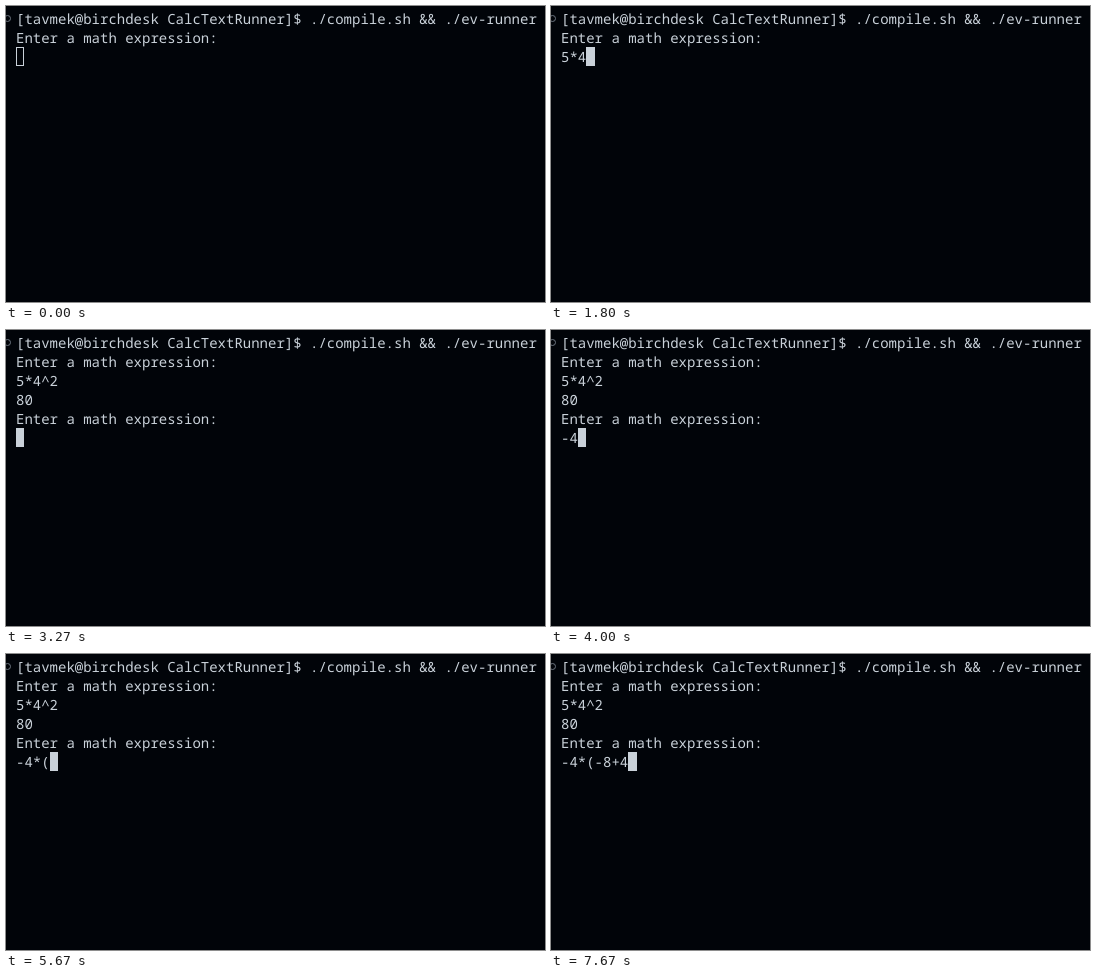
Write an HTML page that moves like this. It is 539 px wide and 296 px high and loops after 8 s.

```html
<!DOCTYPE html>
<html lang="en">
<head>
<meta charset="utf-8">
<title>Terminal</title>
<style>
  html, body {
    margin: 0;
    width: 100%;
    height: 100%;
    overflow: hidden;
    background: #010409;
  }
  #screen {
    position: absolute;
    left: 10px;
    top: 4px;
    margin: 0;
    color: #c9d1d9;
    font: 14px/19px "Noto Sans Mono", monospace;
    font-variant-ligatures: none;
    text-rendering: geometricPrecision;
  }
  #cursor {
    position: absolute;
    box-sizing: border-box;
    height: 19px;
    border: 1px solid #c9d1d9;
  }
  #mark {
    position: absolute;
    left: 0;
    top: 0;
  }
</style>
</head>
<body>
<svg id="mark" width="10" height="24"><circle cx="1.5" cy="12.5" r="3" fill="none" stroke="#6e7681"/></svg>
<pre id="screen"></pre>
<div id="cursor"></div>
<script>
const LOOP = 8000, FOCUS = 70;
const LEFT = 10, TOP = 3, CELL = 8.4, LINE = 19;
const ASK = "Enter a math expression:\n";
const FIRST = "[tavmek@birchdesk CalcTextRunner]$ ./compile.sh && ./ev-runner\n" + ASK;
const SECOND = FIRST + "5*4^2\n80\n" + ASK;

// [start time, text before the cursor]
const steps = [
  ...[[0, ""], [600, "5"], [970, ""], [1030, "5"], [1430, "5*"], [1800, "5*4"],
      [2500, "5*4^"], [3100, "5*4^2"], [3200, "5*4^2\n"]].map(([t, s]) => [t, FIRST + s]),
  ...[[3270, ""], [3870, "-"], [4000, "-4"], [4800, "-4*"], [5130, "-4*(8"], [5670, "-4*("],
      [6200, "-4*(-"], [6900, "-4*(-8"], [7370, "-4*(-8+"], [7670, "-4*(-8+4"]].map(([t, s]) => [t, SECOND + s])
];

const screenEl = document.getElementById("screen");
const cursorEl = document.getElementById("cursor");
const cellX = col => Math.round(LEFT + col * CELL);

function draw(now) {
  const t = now % LOOP;
  const text = steps.findLast(([start]) => start <= t)[1];
  const lines = text.split("\n");
  const col = lines.at(-1).length;
  const x = cellX(col);

  if (screenEl.textContent !== text) screenEl.textContent = text;
  cursorEl.style.left = x + "px";
  cursorEl.style.width = cellX(col + 1) - x + "px";
  cursorEl.style.top = TOP + (lines.length - 1) * LINE + "px";
  cursorEl.style.background = t < FOCUS ? "none" : "#c9d1d9";
}

function tick() {
  draw(performance.now());
  requestAnimationFrame(tick);
}
tick();
</script>
</body>
</html>
```
